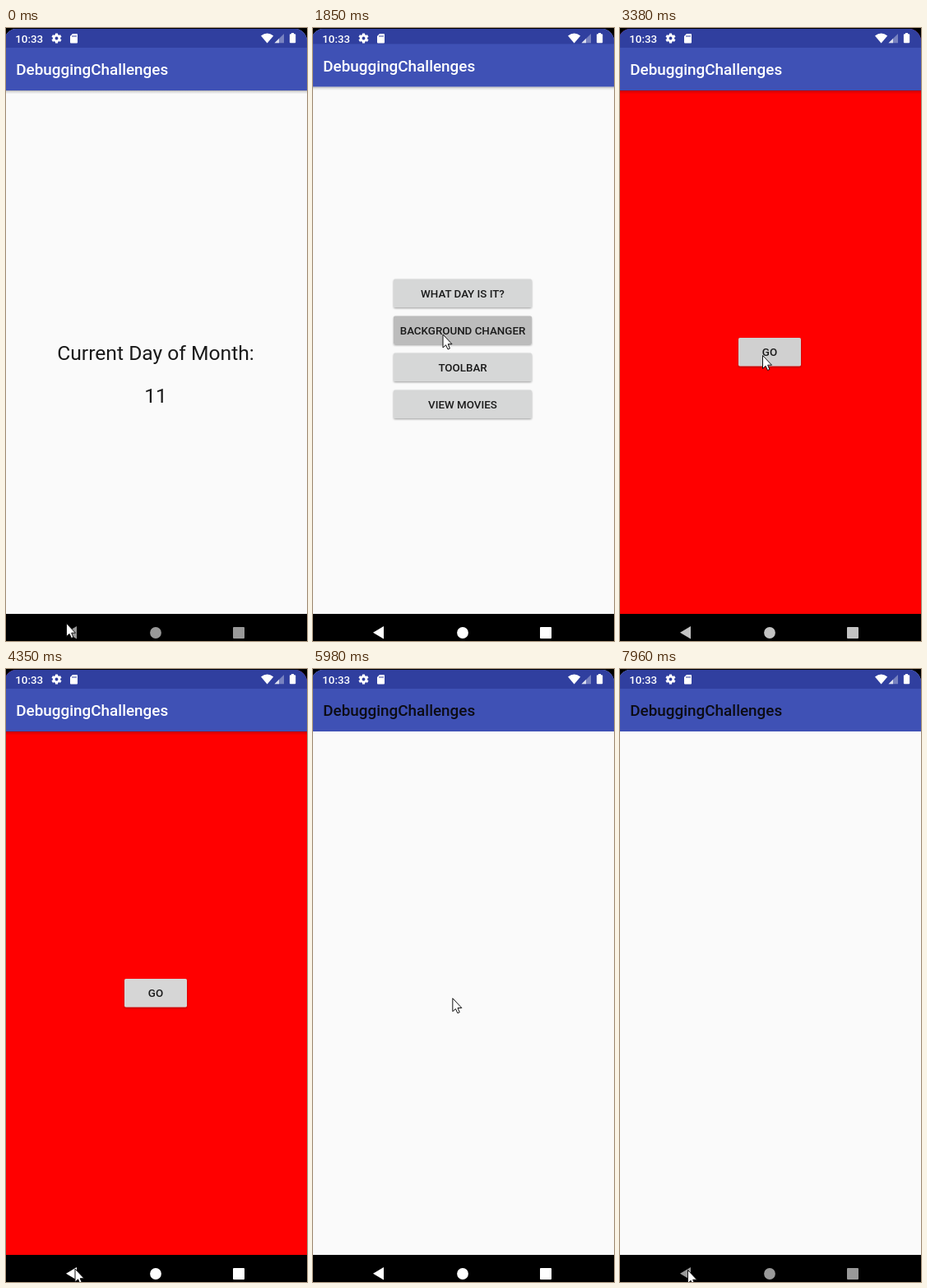
An HTML page for the animation above (8000 ms loop, 366 px wide and 746 px high).

```html
<!DOCTYPE html>
<html lang="en">
<head>
<meta charset="utf-8">
<title>DebuggingChallenges</title>
<style>
  html, body { margin: 0; width: 100%; height: 100%; overflow: hidden; background: #000; }
  svg { display: block; width: 100%; height: 100%; }
  text { font-family: Roboto, sans-serif; }
  .title { font-size: 18.9px; font-weight: 500; }
  .label { font-size: 13.35px; font-weight: 500; fill: #1a1a1a; text-anchor: middle; }
  .day { font-size: 24.65px; fill: #1a1a1a; text-anchor: middle; }
  .clock { font-size: 13.4px; font-weight: 500; }
</style>
</head>
<body>
<svg viewBox="0 0 366 746">
  <defs>
    <linearGradient id="shade" x2="0" y2="1">
      <stop offset="0" stop-opacity=".3"/>
      <stop offset=".35" stop-opacity=".12"/>
      <stop offset="1" stop-opacity="0"/>
    </linearGradient>
    <filter id="lift" x="-5%" y="-20%" width="110%" height="150%">
      <feDropShadow dx="0" dy="1.2" stdDeviation=".8" flood-opacity=".35"/>
    </filter>
    <clipPath id="window"><path d="M-2 713V16A15 15 0 0 1 13 1H351A15 15 0 0 1 366 16V713Z"/></clipPath>
    <clipPath id="reveal"><rect id="revealBox" width="366" height="713"/></clipPath>
  </defs>
  <rect width="366" height="746"/>
  <g id="screens" clip-path="url(#window)"></g>

  <g fill="#fff">
    <text class="clock" x="11.2" y="17.6">10:33</text>
    <g id="gear" transform="translate(61.5 12.5)">
      <circle r="3.3" fill="none" stroke="#fff" stroke-width="2.7"/>
    </g>
    <path d="M81 7H86Q87 7 87 8V17.5Q87 18.5 86 18.5H79Q78 18.5 78 17.5V10Z"/>
    <path d="M81 9v2M83 9v2M85 9v2" stroke="#303f9f"/>
    <path d="M310 9.4Q317.6 3.6 325.2 9.4L317.6 18.4Z"/>
    <path d="M326.5 18.2L338 7V18.2Z" opacity=".35"/>
    <path d="M326.5 18.2L332 12.8V18.2Z" opacity=".75"/>
    <path d="M347 6H350V7.3H351.5L352.2 8V17.6L351.5 18.3H345.6L344.9 17.6V8L345.6 7.3H347Z"/>
  </g>

  <g id="nav">
    <path d="M73 735.8L86 728V743.5Z"/>
    <circle cx="182" cy="736" r="6.9"/>
    <rect x="276" y="729" width="14" height="14" rx="1"/>
  </g>
  <path id="cursor" d="M0 0V16L3.6 12.8L6 18L8.4 17L6.2 11.7H11Z"
        fill="#fff" stroke="#111" stroke-linejoin="round"/>
</svg>
<script>
const LOOP = 8000, HEIGHT = 713;
const $ = id => document.getElementById(id);
const ramp = (t, a, b) => Math.min(1, Math.max(0, (t - a) / (b - a)));
const ease = p => 1 - (1 - p) ** 3;
const mix = (a, b, p) => a + (b - a) * p;
const gray = v => `rgb(${[v, v, v].map(Math.round)})`;

// Pointer glides: from time, to time, x, y
const home = [73.5, 724.5];
const glides = [
  [600, 1000, 103.5, 558.5],
  [1150, 1450, 158, 373],
  [2010, 2290, 173.5, 398.5],
  [3500, 3770, 100, 760],
  [3770, 3890, 100.5, 704.5],
  [4200, 4300, 84, 730],
  [4630, 4920, 163.5, 414.5],
  [5910, 6370, 204.5, 325.5],
  [6520, 6800, 235, 130],
  [7150, 7540, 80, 760],
  [7900, 7960, 82.5, 731.5]
];

// Taps change the screen; a closing screen slides away above the next one.
const moves = [
  { at: 540, from: 'day', to: 'menu', close: true },
  { at: 1800, from: 'menu', to: 'changer', choice: 1 },
  { at: 4400, from: 'changer', to: 'menu', close: true },
  { at: 5400, from: 'menu', to: 'toolbar', choice: 2 }
];
const MOVE_MS = 425, TAP_MS = 80;
const GO_AT = 2430, GO_RELEASE = 2840, GO_FADE = 700;

// The navigation bar wakes on a tap and dims later.
const wakes = [{ at: 460, dim: 3070 }, { at: 4350, dim: 7080 }];
const DIM_MS = 530;

const button = (id, x, y, w, text) => `
  <rect id="${id}" x="${x}" y="${y}" width="${w}" height="34.5" rx="1.8" filter="url(#lift)"/>
  <text class="label" x="${x + w / 2}" y="${y + 22.4}">${text}</text>`;

function addScreen(name, body, plain) {
  $('screens').insertAdjacentHTML('beforeend', `
    <g id="${name}"><g>
      <rect id="${name}Back" y="-40" width="366" height="800" fill="#fafafa"/>
      ${plain ? '' : '<rect y="76" width="366" height="4.5" fill="url(#shade)"/>'}
      <rect y="-40" width="366" height="116" fill="#3f51b5"/>
      <rect y="-40" width="366" height="64" fill="#303f9f"/>
      <text class="title" x="12.2" y="57.3" fill="${plain ? '#0c0c14' : '#fff'}">DebuggingChallenges</text>
      ${body}
    </g></g>`);
}

const choices = ['WHAT DAY IS IT?', 'BACKGROUND CHANGER', 'TOOLBAR', 'VIEW MOVIES'];
addScreen('day', `<text class="day" x="182" y="404.4">Current Day of Month:</text>
  <text class="day" x="182" y="456.4">11</text>`);
addScreen('menu', choices.map((c, i) => button('choice' + i, 98, 310 + 45 * i, 168, c)).join(''));
addScreen('changer', button('go', 144, 377, 76, 'GO'));
addScreen('toolbar', '', true);
const screens = [...$('screens').children];

for (let i = 0; i < 6; i++)
  $('gear').insertAdjacentHTML('beforeend',
    `<rect x="-1.6" y="-6.1" width="3.2" height="2.8" rx=".4" transform="rotate(${i * 60})"/>`);

const latest = (list, t) => list.filter(e => e.at <= t).pop();

const pointer = t => glides.reduce(([x, y], [a, b, u, v]) => {
  const p = ramp(t, a, b);
  return [mix(x, u, p), mix(y, v, p)];
}, home);

function place(name, shift, clipped) {
  const g = $(name);
  g.style.display = '';
  g.firstElementChild.setAttribute('transform', `translate(0 ${shift})`);
  g.setAttribute('clip-path', clipped ? 'url(#reveal)' : 'none');
  $('screens').append(g);
}

function showScreens(t) {
  for (const s of screens) s.style.display = 'none';
  const move = latest(moves, t);
  if (!move) return place('day', 0);
  const p = ease(ramp(t, move.at, move.at + MOVE_MS));
  if (p === 1) return place(move.to, 0);
  const shown = move.close ? 1 - p : p;
  const [top, under] = move.close ? [move.from, move.to] : [move.to, move.from];
  $('revealBox').setAttribute('y', HEIGHT * (1 - shown));
  place(under, -0.02 * HEIGHT * shown);
  place(top, 0.041 * HEIGHT * (1 - shown), true);
}

function draw(t) {
  showScreens(t);

  const tapped = latest(moves, t + TAP_MS);
  choices.forEach((_, i) =>
    $('choice' + i).setAttribute('fill', tapped?.choice === i ? '#bcbcbc' : '#d6d7d7'));

  const lit = t >= GO_AT;
  const press = lit ? 1 - ramp(t, GO_RELEASE, GO_RELEASE + GO_FADE) : 0;
  $('go').setAttribute('fill', gray(mix(214, 188, press)));
  $('changerBack').setAttribute('fill', lit ? '#f00' : '#fafafa');

  const wake = latest(wakes, t);
  const dim = wake ? ramp(t, wake.dim, wake.dim + DIM_MS) : 1;
  $('nav').setAttribute('fill', gray(mix(255, 153, dim)));
  $('cursor').setAttribute('transform', `translate(${pointer(t)})`);
}

const start = performance.now();
function frame() {
  draw((performance.now() - start) % LOOP);
  requestAnimationFrame(frame);
}
frame();
</script>
</body>
</html>
```
